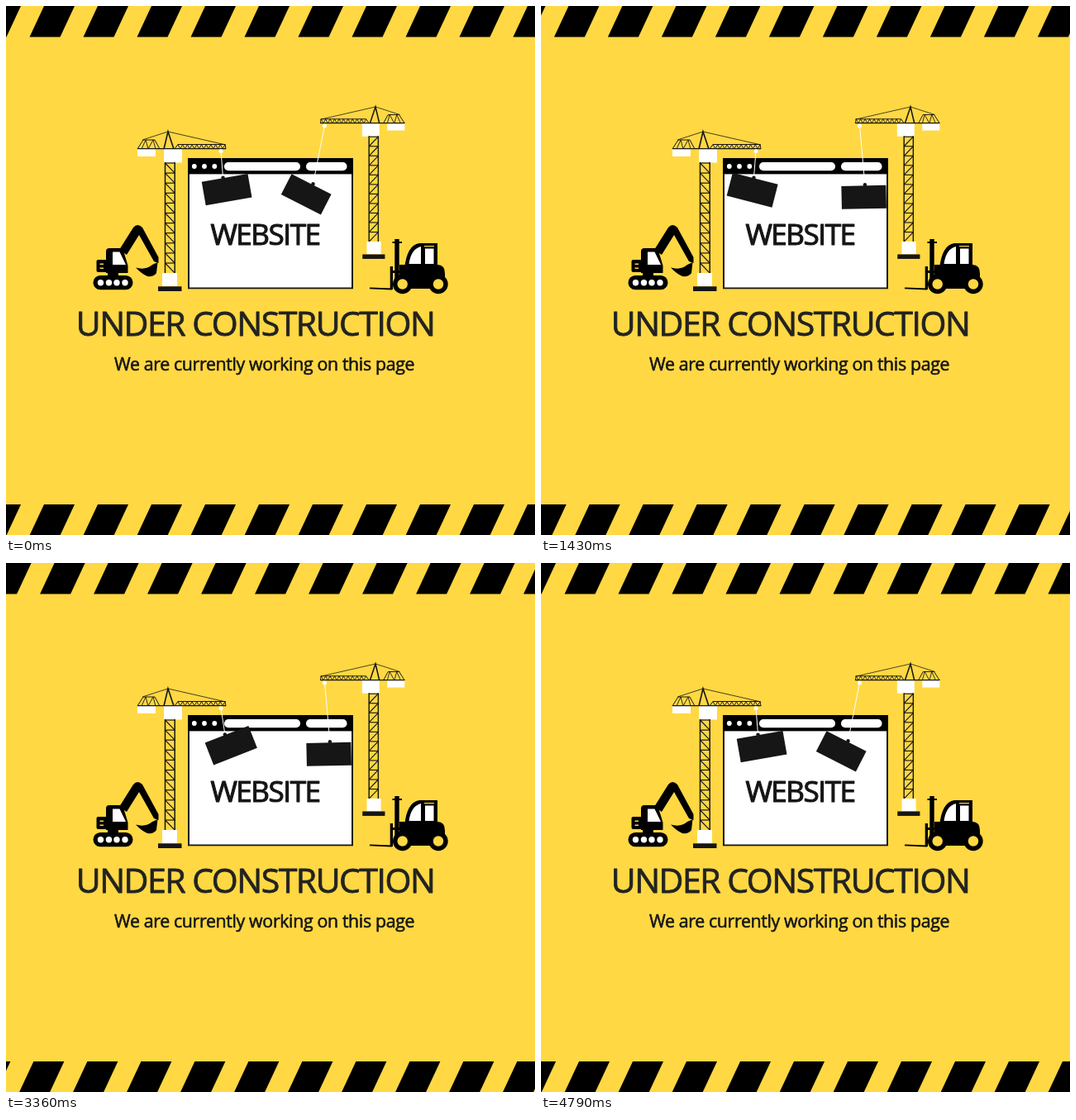
These frames come from a looping animation (640x640 px, 4.87 s). An HTML page with a canvas:

```html
<!DOCTYPE html>
<html lang="en">
<head>
<meta charset="utf-8">
<title>Under construction</title>
<style>
  html, body { margin: 0; width: 100%; height: 100%; overflow: hidden; background: #ffd843; }
  canvas { display: block; }
</style>
</head>
<body>
<canvas id="stage" width="640" height="640"></canvas>
<script>
const ctx = document.getElementById('stage').getContext('2d');
const YELLOW = '#ffd843', BLACK = '#000', WHITE = '#fff', DARK = '#161616';
const LOOP = 4870, FPS = 14, LAST = 67;

function rect(x, y, w, h, color) {
  ctx.fillStyle = color;
  ctx.fillRect(x, y, w, h);
}

function pill(x, y, w, h, r, color) {
  ctx.fillStyle = color;
  ctx.beginPath();
  ctx.roundRect(x, y, w, h, r);
  ctx.fill();
}

function disc(x, y, r, color) {
  ctx.fillStyle = color;
  ctx.beginPath();
  ctx.arc(x, y, r, 0, Math.PI * 2);
  ctx.fill();
}

function poly(color, ...points) {
  ctx.fillStyle = color;
  ctx.beginPath();
  points.forEach(p => ctx.lineTo(p[0], p[1]));
  ctx.fill();
}

function line(color, width, ...points) {
  ctx.strokeStyle = color;
  ctx.lineWidth = width;
  ctx.beginPath();
  points.forEach(p => ctx.lineTo(p[0], p[1]));
  ctx.stroke();
}

function shape(color, path) {
  ctx.fillStyle = color;
  ctx.fill(new Path2D(path));
}

function text(str, x, y, size, spacing, color, weight) {
  ctx.font = `${size}px "Open Sans", "Noto Sans", sans-serif`;
  ctx.letterSpacing = spacing + 'px';
  ctx.fillStyle = ctx.strokeStyle = color;
  ctx.lineWidth = weight;
  ctx.lineJoin = 'round';
  ctx.fillText(str, x, y);
  ctx.strokeText(str, x, y);
  ctx.lineJoin = 'miter';
}

function stripes(y, shift) {
  const start = ((46 + shift) % 65 + 65) % 65 - 65;
  for (let x = start; x < 660; x += 65) {
    poly(BLACK, [x, y], [x + 37, y], [x + 19.5, y + 37.5], [x - 17.5, y + 37.5]);
  }
}

// Local origin is the apex; a negative flip points the jib to the left.
function crane(x, y, flip, scale) {
  ctx.save();
  ctx.translate(x, y);
  ctx.scale(flip * scale, scale);

  rect(-37, 21, 22, 9, WHITE);
  rect(-5, 21, 22, 16.5, WHITE);

  line(DARK, 1.3, [-37, 20.7], [70, 20.7]);
  line(DARK, 0.8, [-31, 10], [0, 0], [70, 16]);
  line(DARK, 1.6, [-5, 21], [0, 0], [7, 21]);
  line(DARK, 1, [-37, 21], [-30, 10], [-16, 10], [-10, 21]);
  line(DARK, 0.9, [-32, 21], [-27, 10], [-24, 21], [-18, 10], [-15, 21]);

  line(DARK, 1, [8, 21], [12, 15.5], [69, 15.5], [70, 21]);
  const web = [];
  for (let i = 0; i <= 20; i++) web.push([12 + i * 2.85, i % 2 ? 21 : 15.5]);
  line(DARK, 0.9, ...web);

  line(DARK, 1.5, [-3.5, 37], [-3.5, 171]);
  line(DARK, 1.5, [8.2, 37], [8.2, 171]);
  for (let i = 0; i < 11; i++) {
    const top = 38 + i * 12.1;
    line(DARK, 1.2, [-3.5, top], [8.2, top]);
    line(DARK, 1.2, [-3.5, top], [8.2, top + 12.1]);
  }
  rect(-7, 171, 18, 16, WHITE);
  rect(-12, 187.3, 28.5, 5.7, DARK);
  ctx.restore();
}

function browser() {
  rect(220, 184, 200, 158.3, DARK);
  rect(222, 203, 196, 137.5, WHITE);
  rect(220, 184, 200, 19.4, BLACK);
  for (const x of [227.8, 240, 252.3]) disc(x, 194, 2.9, WHITE);
  pill(264, 189, 92, 10.3, 5, WHITE);
  pill(363, 189, 49.5, 10.3, 5, WHITE);
}

function excavator() {
  pill(105.5, 326, 48, 17.3, 8.6, BLACK);
  for (const x of [114.5, 124.5, 134, 144]) disc(x, 334.7, 3.7, WHITE);
  rect(123, 318, 13, 9, BLACK);
  pill(109.5, 307, 14, 15, 2, BLACK);
  shape(BLACK, 'M121 323V297Q121 293 125 293H138Q141 293 142 296L147.5 314V323Z');
  shape(WHITE, 'M129 297.5H137.5L145 313H129Z');
  rect(113.5, 311.5, 4.5, 1.5, YELLOW);
  rect(113.5, 316.5, 4.5, 1.5, YELLOW);
  shape(BLACK, 'M137 295L154 268Q159 262 165 268L184.5 304V311L179 309L161 277L146 301Z');
  shape(BLACK, 'M157 316.5Q169 320 177 313L183.5 310L182 323Q179 328 171 327Q164 324 157 316.5Z');
}

function forklift() {
  line(BLACK, 1.8, [440, 341.3], [467, 342.5]);
  rect(464.7, 315, 3.3, 28, BLACK);
  rect(470.3, 282, 5.4, 61, BLACK);
  rect(467.5, 285, 11.5, 2, BLACK);
  rect(467, 320, 10, 3, BLACK);
  shape(BLACK, 'M482 318Q485 289 500 287H522V316Z');
  shape(WHITE, 'M487.5 312Q490 294 502 291V312Z');
  shape(WHITE, 'M507 293.5H517.5V312H507Z');
  rect(506, 290, 12, 1.2, YELLOW);
  shape(BLACK, 'M476 313H522Q531 313 531 324V342H476Z');
  for (const x of [479.7, 523]) {
    disc(x, 336.5, 11.7, BLACK);
    disc(x, 336.5, 6.2, YELLOW);
  }
}

function load(x, y, rope, dx, degrees, offset, w, h) {
  const hx = x + dx, hy = y + Math.sqrt(rope * rope - dx * dx);
  line(WHITE, 1, [x, y], [hx, hy]);
  disc(x, y + 0.5, 2.5, WHITE);
  disc(hx, hy, 2.2, DARK);
  ctx.save();
  ctx.translate(hx, hy);
  ctx.rotate(degrees * Math.PI / 180);
  rect(offset - w / 2, 15.1 - h / 2, w, h, DARK);
  ctx.restore();
}

function draw(step) {
  const shift = step * 260 / LAST;
  const swing = peak => Math.cos((step - peak) / LAST * Math.PI * 2);

  rect(0, 0, 640, 640, YELLOW);
  stripes(0, -shift);
  stripes(603, shift);

  browser();
  crane(196, 152, 1, 1);
  crane(447, 122, -1, 0.953);
  excavator();
  forklift();

  const left = swing(19.5), right = swing(0);
  load(260, 175.2, 32.5, 1.5 - 4 * left, -5 + 19.5 * left, 2, 56.6, 28.8);
  load(385.5, 144.5, 72, 1.7 - 15.7 * right, 5.3 + 21.8 * right, -1.6, 54, 27.8);

  text('WEBSITE', 247.4, 289, 35, -1.45, DARK, 1.1);
  text('UNDER CONSTRUCTION', 84.8, 398.6, 41, -1.5, '#222', 0.8);
  text('We are currently working on this page', 131, 441, 21.3, -0.33, DARK, 0.6);
}

const begin = performance.now();

function tick() {
  const time = Math.max(0, performance.now() - begin) % LOOP;
  const ticks = Math.floor(time / 10) * 10;
  draw(Math.min(LAST, Math.floor((ticks + 5) * FPS / 1000)));
  requestAnimationFrame(tick);
}
tick();
</script>
</body>
</html>
```
